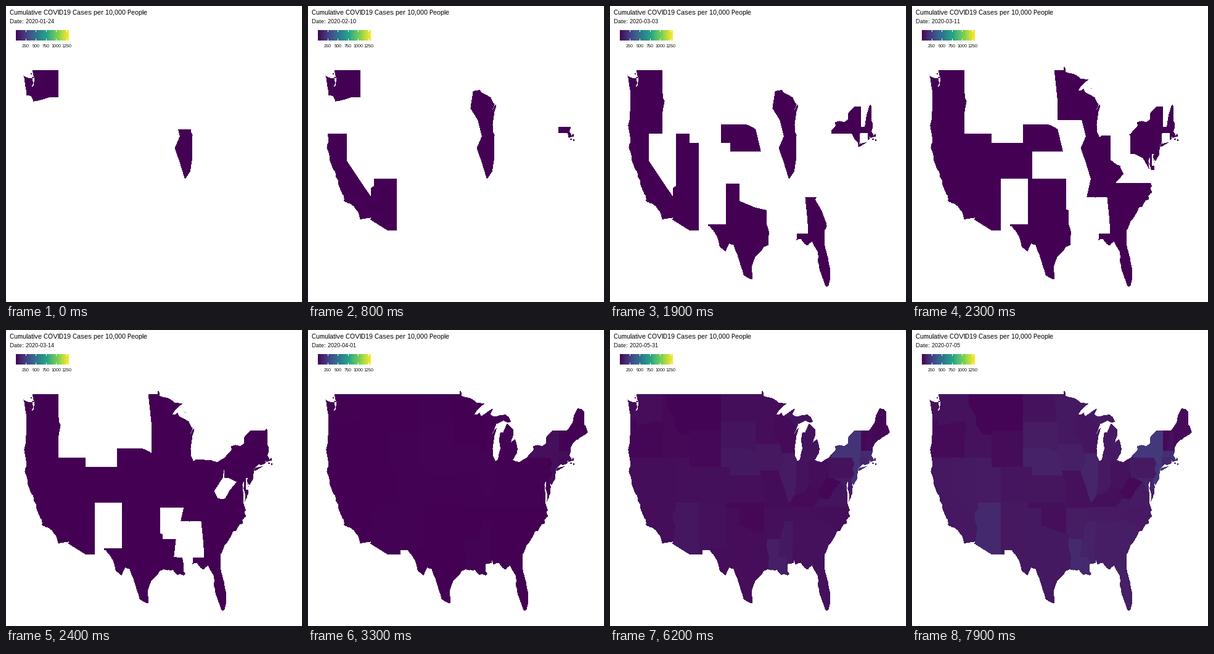
Write a matplotlib script that moves like this. It is 480 px wide and 480 px high and loops after 8 s.

```python
import numpy as np
import matplotlib.pyplot as plt
from matplotlib.animation import FuncAnimation
from matplotlib.path import Path

SIZE, FRAMES, STEP = 480, 80, 100
DAYS_PER_FRAME = 2.0635
TOP = 1300  # upper end of the colour scale
START = np.datetime64("2020-01-24")
rng = np.random.default_rng(4)
plt.rcParams.update({"text.hinting": "no_autohint", "text.hinting_factor": 1})

# ---- colour ramp, blended in Lab space ----
XYZ = np.array([[.4124, .3576, .1805], [.2126, .7152, .0722], [.0193, .1192, .9505]])
WHITE = XYZ.sum(axis=1)


def to_lab(rgb):
    c = np.asarray(rgb) / 255
    lin = np.where(c > .04045, ((c + .055) / 1.055) ** 2.4, c / 12.92)
    t = lin @ XYZ.T / WHITE
    return np.where(t > .008856, np.cbrt(t), 7.787 * t + 16 / 116)


def from_lab(f):
    t = np.where(f > .2069, f ** 3, (f - 16 / 116) / 7.787) * WHITE
    lin = np.clip(t @ np.linalg.inv(XYZ).T, 0, 1)
    c = np.where(lin > .0031308, 1.055 * lin ** (1 / 2.4) - .055, 12.92 * lin)
    return np.round(c * 255).astype(np.uint8)


STOPS = to_lab(plt.get_cmap("viridis")(np.linspace(0, 1, 6))[:, :3] * 255)


def ramp(t):
    pos = np.linspace(0, 1, len(STOPS))
    return from_lab(np.stack([np.interp(t, pos, ch) for ch in STOPS.T], axis=-1))


# ---- land: key points in (degrees west, degrees north) ----
def rough(points, passes=2, amount=.04):
    """Fractal shoreline through key points."""
    p = np.array(points, float)
    for _ in range(passes):
        d = np.diff(p, axis=0)
        normal = np.column_stack([-d[:, 1], d[:, 0]])
        mid = p[:-1] + d / 2 + normal * rng.normal(0, amount, (len(d), 1))
        p = np.insert(p, np.arange(1, len(p)), mid, axis=0)
    return p


pacific = rough([
    (122.76, 49), (122.5, 48.4), (122.25, 48), (122.4, 47.3), (122.9, 47.1), (122.55, 47.5),
    (122.75, 48.14), (123.7, 48.16), (124.7, 48.38), (124.4, 47.7), (124.05, 46.6), (124, 45),
    (124.15, 43.7), (124.55, 42.85), (124.2, 42), (124.1, 41), (124.4, 40.45), (123.8, 39.5),
    (123.7, 38.93), (122.95, 38), (122.5, 37.75), (122.4, 37.2), (121.85, 36.8), (121.95, 36.5),
    (121.3, 35.67), (120.65, 35.1), (120.6, 34.55), (119.4, 34.3), (118.5, 34), (117.6, 33.4),
    (117.12, 32.53)])
border = [(114.72, 32.72), (114.81, 32.5), (111.07, 31.33), (108.21, 31.33), (108.21, 31.78)]
gulf = rough([
    (106.53, 31.78), (105, 30.65), (104.4, 29.55), (103.1, 28.98), (102.3, 29.87), (101.4, 29.77),
    (100.3, 28.3), (99.2, 26.4), (97.15, 25.95), (97.4, 27.3), (96.6, 28.35), (95.1, 29.1),
    (94.7, 29.5), (93.85, 29.7), (92.3, 29.55), (91.8, 29.6), (90.9, 29.05), (90.1, 29.15),
    (89.4, 28.98), (89.05, 29.15), (89.5, 29.5), (89.5, 30.2), (88.2, 30.35), (88, 30.65),
    (87.8, 30.25), (86.5, 30.38), (85.35, 29.68), (84.9, 29.7), (84.1, 30.1), (82.75, 28.9),
    (82.8, 27.9), (82.1, 26.6), (81.8, 26.1), (81.1, 25.15), (80.45, 25.2)])
atlantic = rough([
    (80.12, 25.9), (80.03, 26.8), (80.55, 28.3), (81.3, 29.9), (81.3, 31.3), (80.45, 32.35),
    (79.3, 33.1), (78.55, 33.86), (77.95, 33.87), (77.1, 34.65), (76.4, 34.75), (76.5, 35.1),
    (75.75, 35.5), (76.1, 35.95), (75.75, 36.2), (76.3, 37), (76.3, 37.9), (76.5, 39),
    (76.1, 39.4), (76.25, 38.6), (75.85, 37.95), (75.97, 37.15), (75.25, 38.03), (75.1, 38.8),
    (75.55, 39.5), (74.95, 38.93), (74.1, 39.75), (74.05, 40.7), (72.9, 41.25), (71.5, 41.37),
    (71.4, 41.75), (71.2, 41.5), (70.65, 41.6), (70, 41.65), (70.15, 42.07), (70.5, 41.78),
    (71, 42.3), (70.65, 42.65), (70.75, 43.07), (70.2, 43.6), (69.1, 44), (68.3, 44.3),
    (66.97, 44.8)])
maine = [(67.45, 45.5), (67.8, 45.7), (67.8, 47.07), (68.3, 47.35), (69, 47.42), (69.22, 47.45),
         (70, 46.7), (70.3, 45.9), (71.08, 45.3), (71.5, 45.01), (74.7, 45)]
lakes = rough([
    (74.7, 45), (76.2, 44.2), (76.2, 43.55), (77, 43.27), (79.05, 43.27), (78.9, 42.87),
    (80.5, 41.97), (82, 41.5), (83.45, 41.73), (82.5, 42.6), (82.42, 43), (82.95, 44.07),
    (83.9, 43.65), (83.3, 44.5), (83.4, 45.1), (84.75, 45.78), (85.1, 45.4), (85.6, 44.8),
    (86.2, 44.8), (86.5, 44), (86.2, 43), (86.75, 41.8), (87.3, 41.63), (87.8, 42.2),
    (87.9, 43), (87.5, 44.4), (87, 45.3), (88, 44.55), (87.1, 45.7), (85.5, 46.08),
    (84.75, 45.88), (83.9, 45.97), (84.4, 46.5), (85, 46.75), (87.4, 46.52), (88.45, 46.8),
    (87.8, 47.42), (88.9, 47.1), (90.4, 46.57), (90.75, 46.95), (92, 46.72), (91.3, 47.25),
    (89.6, 48), (91.4, 48.07), (93, 48.6), (94.7, 48.8)], passes=1)
angle = [(94.85, 49.35), (95.15, 49.37), (95.15, 49)]
long_island = [(74, 40.6), (73.75, 40.85), (71.9, 41.07), (73.5, 40.58)]

yy, xx = np.mgrid[:SIZE, :SIZE] + .5
west, north = 124.73 - (xx - 28) / 7.37, 49 - (yy - 104) / 14.7
grid = np.column_stack([west.ravel(), north.ravel()])
mainland = np.concatenate([pacific, border, gulf, atlantic, maine, lakes, angle])
land = Path(mainland).contains_points(grid) | Path(long_island).contains_points(grid)
land = land.reshape(SIZE, SIZE)
for w, n in [(122.97, 48.6), (122.6, 48.2), (70.65, 41.39), (70.05, 41.28)]:  # islets
    land |= np.hypot(west - w, 2 * (north - n)) < .17

# ---- states ----
WAVES = {0: "WA IL", 2: "CA", 4: "AZ", 9: "MA", 13: "WI", 20: "TX", 25: "NE", 35: "UT OR",
         39: "FL NY RI GA NH", 43: "NC NJ CO MD NV TN", 45: "IN KY MN OK PA SC",
         48: "KS MO VA VT CT IA LA OH"}
LAST_WAVE = 52
FIRST_DAY = {name: day for day, names in WAVES.items() for name in names.split()}
EARLY = "NY NJ MA RI CT VT".split()
LATE = "AZ TX CA FL SC NC AL AR UT TN NV GA ID OK MN WI OR".split()
labels = np.zeros((SIZE, SIZE), int)
starts, cases, power = [], [], []


def side(edge, along):
    """A side is a constant, or key points (along, value)."""
    if np.isscalar(edge):
        return edge
    return np.interp(along, *np.array(sorted(edge)).T)


def state(name, july, w, n, e, s):
    starts.append(FIRST_DAY.get(name, LAST_WAVE))
    cases.append(july)
    power.append(.33 if name in EARLY else 2.1 if name in LATE else 1.1)
    inside = (west <= side(w, north)) & (west > side(e, north))
    inside &= (north <= side(n, west)) & (north > side(s, west))
    labels[land & inside] = len(starts)


# Shared lines: rivers running north give (north, west), others (west, north).
MISSISSIPPI = [(31, 91.6), (33, 91.1), (35, 90.1), (37, 89.2), (38.8, 90.3), (40.4, 91.4),
               (41.7, 90.3), (43.5, 91.2), (44.8, 92.8), (46.7, 92.2), (46.95, 89)]
OHIO = [(80.6, 40.6), (80.8, 39.8), (82.6, 38.4), (83.7, 38.65), (84.8, 39.1), (85.6, 38.2),
        (88, 37.8), (89.1, 37)]
DELAWARE = [(38.9, 75.2), (39.5, 75.55), (40.2, 74.75), (40.7, 75.2), (41.4, 74.7)]
CONNECTICUT = [(42.7, 72.5), (44, 72.1), (45, 71.5)]

# Later states cover earlier ones, so each border is described once.
state("VA", 77, 83.68, 39.5, 75, 36.55)
state("MD", 115, 79.48, 39.72, 75,
      [(75, 38), (76.2, 37.95), (77.05, 38.7), (77.75, 39.32), (79.48, 39.2)])
state("DE", 122, 75.79, 39.83, 75, 38.46)
state("WV", 19, 82.6, 40.64,
      [(37.2, 81.9), (37.5, 80.3), (38.4, 79.3), (39.3, 77.8), (39.72, 79.5), (39.73, 80.52)],
      [(80.3, 37.4), (82, 37.5), (82.6, 38.2)])
state("PA", 72, 80.52, 42.4, 74.5, 39.72)
state("NJ", 196, DELAWARE, 41.4, 73.8, 38.8)
state("NY", 204, 79.77, 45.2, 71.7, [(73.9, 40.5), (74, 41), (74.7, 41.36), (75.35, 42)])
state("ME", 25, 71.1, 48, 66, 43)
state("VT", 20, 73.35, 45.1, CONNECTICUT, 42.73)
state("NH", 43, CONNECTICUT, 45.35, [(43.1, 70.7), (43.4, 70.97), (45.3, 71.08)], 42.7)
state("CT", 131, [(41, 73.65), (42.05, 73.5)], 42.04, 71.83, [(71.8, 41.25), (73.6, 41)])
state("RI", 160, 71.83, 42.03, 71.1, 41.2)
state("MA", 159, 73.4, 42.73, 69, [(71.1, 41), (71.2, 41.6), (71.4, 42.03)])

state("MI", 73, 90.5, 48, 82, 41.72)
state("OH", 49, 84.81, 41.72, 80.52, OHIO)
state("IN", 71, 88, 41.76, 84.81, OHIO)
state("WI", 57, 93, 47.2, [(45, 86.8), (45.4, 87.8), (46, 88.3), (46.55, 90.4)], 42.5)
state("IL", 117, MISSISSIPPI, 42.5, [(37.8, 88), (39.3, 87.53), (41.8, 87.53), (41.9, 87)], OHIO)
state("KY", 38, 89.5, OHIO, [(36.6, 83.68), (37.54, 81.97), (38.2, 82.6)], 36.55)

state("TN", 76, 90.4, 36.55, 81.5, 35)
state("NC", 71, 84.32, [(81.68, 36.58), (82.1, 36.1), (84.32, 35)], 75, 33.8)
state("SC", 90, 83.4, [(78.55, 33.86), (79.67, 34.8), (80.8, 34.82), (81.05, 35.15), (82.4, 35.2),
                       (83.35, 34.9)], 78, 31.9)
state("FL", 93, 87.6, 31, 79.9, 24.9)
state("MS", 103, MISSISSIPPI, 35, 88.2, 30)
state("AL", 88, [(31, 88.4), (35, 88.15)], 35, 84.9, [(87.45, 31), (87.5, 30.1)])
state("GA", 87, [(31, 85), (32.3, 85.05), (35, 85.6)], 35,
      [(30.7, 81), (32, 80.85), (33.5, 81.95), (34.7, 83.35), (35, 83.1)],
      [(81.4, 30.7), (82.1, 30.4), (82.2, 30.57), (84.9, 30.7)])
state("LA", 141, 94.1, 33, [(28.8, 88.5), (30.1, 89.4), (31, 89.73), (31.01, 91.6), (33, 91.15)], 28.8)
state("OK", 37, [(36.5, 100), (36.51, 103.03)], 37, 94.45, 33.6)
state("AR", 79, 94.55, 36.5, MISSISSIPPI, 33)

state("KS", 55, 102.05, 40, 94.6, 37)
state("MO", 40, [(39.1, 94.62), (40, 95.3), (40.6, 95.8)], 40.6, MISSISSIPPI, 36.5)
state("MN", 68, 97.3, 49.5, MISSISSIPPI, 43.5)
state("IA", 97, 96.6, 43.5, MISSISSIPPI, 40.55)
state("ND", 49, 104.05, 49.1, [(46, 96.6), (47, 96.8), (49, 97.23)], 45.94)
state("SD", 79, 104.05, 45.94, 96.45, 42.5)
state("NE", 103, 104.05, 43, [(40, 95.3), (41.7, 96.1), (42.5, 96.5), (42.8, 97.5), (43, 98.5)],
      [(102.04, 40), (102.05, 41)])

state("MT", 11, 116.1, 49.1, 104.04, 44.4)
state("ID", 45, 117.04, 49.1, [(42, 111.05), (44.5, 111.06), (44.6, 113), (45.6, 114.4),
                               (46.6, 114.5), (47.5, 115.7), (48, 116.05)], 42)
state("OR", 25, 125, 46.4, [(44.2, 117.03), (45.6, 116.5), (46, 116.9)], 42)
state("WA", 47, 125, 49.5, 117.04,
      [(117, 46), (119, 46), (121.2, 45.65), (122.5, 45.55), (123, 46.15), (125, 46.3)])
state("UT", 77, 114.04, 42, 109.05, 37)
state("WY", 28, 111.05, 45, 104.05, 41)
state("CO", 58, 109.05, 41, 102.05, 37)
state("NM", 65, 109.05, 37, 103.02, 31.3)
state("AZ", 135, 115, 37, 109.05, 31)
state("NV", 72, 120, 42, [(36, 114.75), (36.2, 114.04)], 35)
state("CA", 67, 125, 42, [(32.7, 114.65), (34.3, 114.13), (35, 114.63), (39, 120)], 32)
state("TX", 69, 107, [(94.04, 33.55), (96.6, 33.85), (100, 34.56), (100.01, 36.5), (103.04, 36.5),
                      (103.05, 32)], [(29.7, 93.7), (31.2, 93.55), (32, 94.04)], 25)

# Any sliver left between states joins its neighbour.
for _ in range(4):
    for axis, shift in [(0, 1), (0, -1), (1, 1), (1, -1)]:
        gap = land & (labels == 0)
        labels[gap] = np.roll(labels, shift, axis)[gap]

starts, cases, power = map(np.array, (starts, cases, power))

# ---- picture ----
fig = plt.figure(figsize=(6, 6), dpi=80, facecolor="white")
ax = fig.add_axes([0, 0, 1, 1])
ax.axis("off")
TICKS = {t: 15.6 + .066 * t for t in range(250, TOP, 250)}


def text(x, y, label, px, **kw):
    return ax.text(x, y, label, fontsize=px * .9, family="Liberation Sans", color="black", **kw)


def paint(day):
    grown = np.clip((day - 50) / 113, 0, 1) ** power
    onset = np.clip((day - 44) / 50, 0, 1) ** 1.5
    colours = np.full((len(starts) + 1, 3), 255, np.uint8)
    colours[1:] = ramp(cases * grown * onset / TOP)
    colours[1:][day < starts] = 255
    img = colours[labels]
    img[39:56, 16:102] = ramp(np.linspace(0, 1, 86))
    for x in TICKS.values():
        img[39:42, int(x)] = img[53:56, int(x)] = 255
    return img


picture = ax.imshow(paint(0), extent=(0, SIZE, SIZE, 0), interpolation="nearest", aspect="auto")
ax.set(xlim=(0, SIZE), ylim=(SIZE, 0))
text(6, 14, "Cumulative COVID19 Cases per 10,000 People", 11)
date = text(6, 28, "", 9)
for tick, x in TICKS.items():
    text(x, 67, str(tick), 7, ha="center")


def update(i):
    day = i * DAYS_PER_FRAME
    picture.set_data(paint(day))
    date.set_text(f"Date: {START + round(day)}")
    return picture, date


anim = FuncAnimation(fig, update, frames=FRAMES, interval=STEP, repeat=True, repeat_delay=0)
plt.show()
```
